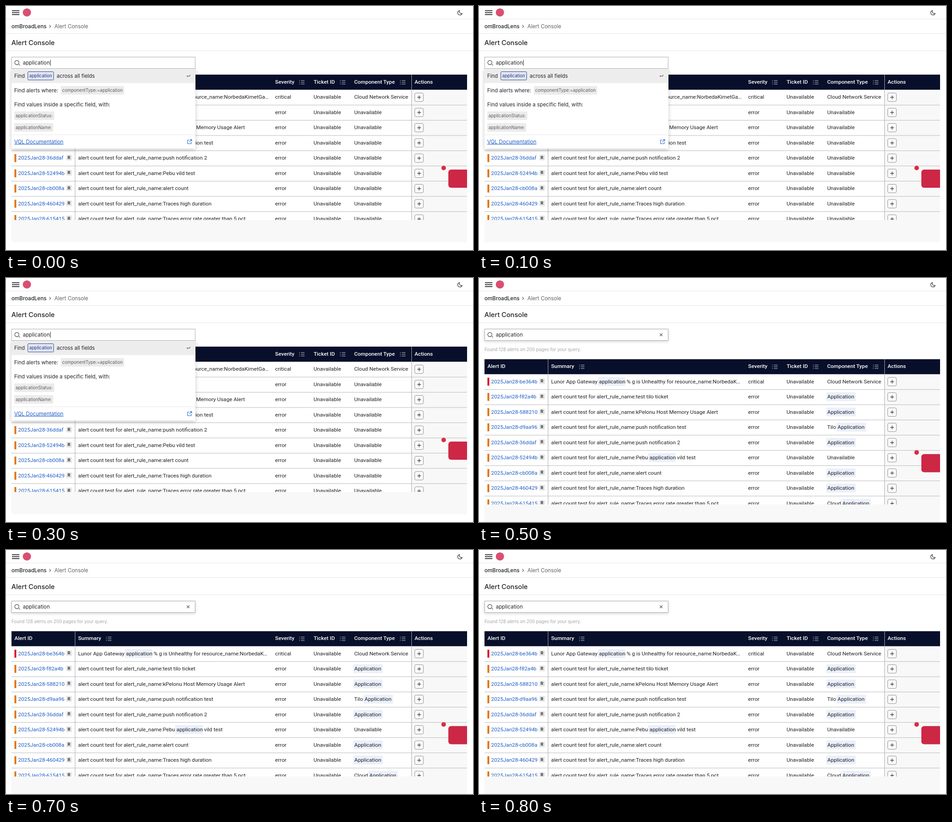
An HTML page that plays this animation: 1023x537 px, repeating every 1.15 s.

```html
<!DOCTYPE html>
<html lang="en">
<head>
<meta charset="utf-8">
<title>Alert Console</title>
<style>
  html, body { margin: 0; width: 100%; height: 100%; overflow: hidden; background: #fff; }
  svg { display: block; width: 1023px; height: 537px; }
  text { font: 11.4px Inter, sans-serif; fill: #24252b; }
  .crumb { font-size: 11.6px; }
  .title { font-size: 14.65px; }
  .medium { font-weight: 500; }
  .muted { fill: #5f6066; }
  .note { font-size: 9.7px; fill: #a5a5a8; }
  .code { font-size: 9.65px; fill: #5c5c60; }
  .picked { fill: #24377e; }
  .cell, .head, .id { font: 11.76px Roboto, sans-serif; }
  .cell { fill: #202127; }
  .head { font-weight: 500; fill: #fff; }
  .id { fill: #1f5ec4; }
  .badge { font: 700 9.4px Roboto, sans-serif; fill: #333; }
  .link { fill: #2160c9; text-decoration: underline; text-underline-offset: 2px; }
  .panel { filter: drop-shadow(0 3px 4px rgba(0, 0, 0, .22)); }
  .field { filter: drop-shadow(0 2px 3px rgba(0, 0, 0, .16)); }
</style>
</head>
<body>
<svg id="stage" viewBox="0 0 1023 537"></svg>
<script>
const LOOP = 1150, SEARCH_AT = 500;
const ROW_H = 33.5, BODY_TOP = 184.5, RESULT_SHIFT = 27.4;

const text = (x, y, value, cls) => `<text x="${x}" y="${y}" class="${cls || ''}">${value}</text>`;
const rect = (x, y, w, h, fill, extra = '') =>
  `<rect x="${x}" y="${y}" width="${w}" height="${h}" fill="${fill}" ${extra}/>`;
const line = (d, color, width = 1, extra = '') =>
  `<path d="${d}" fill="none" stroke="${color}" stroke-width="${width}" ${extra}/>`;

const prefix = 'alert count test for alert_rule_name:';
// id, rule name, component type once the search has run
const alerts = [
  ['be364b', '', 'Cloud Network Service'],
  ['f82a4b', 'test tilo ticket', 'Application'],
  ['588210', 'kPelonu Host Memory Usage Alert', 'Application'],
  ['d9aa96', 'push notification test', 'Tilo Application'],
  ['36ddaf', 'push notification 2', 'Application'],
  ['52494b', 'Pebu vild test', 'Unavailable'],
  ['cb008a', 'alert count', 'Application'],
  ['460429', 'Traces high duration', 'Application'],
  ['615415', 'Traces error rate greater than 5 pct', 'Cloud Application'],
];
const matchX = { 'Application': 763, 'Tilo Application': 785.5, 'Cloud Application': 796 };

function marked(x, y, word) {
  const width = word[0] === 'A' ? 65 : 60;
  return rect(x - 2.5, y - 13.7, width, 19.5, '#ebf0fa', 'rx="2"') + text(x, y, word, 'cell');
}

function summary(i, rule, y, found) {
  if (i === 0 && !found) return text(394.4, y, 'resource_name:NorbedaKimetGa…', 'cell');
  if (i === 0) return text(158, y, 'Lunor App Gateway', 'cell') + marked(263, y, 'application')
    + text(323.5, y, '% g is Unhealthy for resource_name:NorbedaK…', 'cell');
  if (i === 5 && found) return text(158, y, prefix + 'Pebu', 'cell')
    + marked(373.5, y, 'application') + text(433.7, y, 'vild test', 'cell');
  return text(158, y, prefix + rule, 'cell');
}

function component(i, type, y, found) {
  if (!found && i > 0) return text(762.7, y, 'Unavailable', 'cell');
  if (!matchX[type]) return text(762.7, y, type, 'cell');
  const lead = type.replace('Application', '').trim();
  return text(762.7, y, lead, 'cell') + marked(matchX[type], y, 'Application');
}

function row([id, rule, type], i, found) {
  const top = BODY_TOP + i * ROW_H, y = top + 19.7;
  return rect(18.5, top + 7.5, 4, 17.5, i ? '#e0720f' : '#d90a20')
    + text(26.6, y, '2025Jan28-' + id, 'id')
    + rect(131.7, top + 8.5, 13, 13, '#e9e9ea', 'rx="2"') + text(135, top + 18.4, 'R', 'badge')
    + summary(i, rule, y, found)
    + text(589.6, y, i ? 'error' : 'critical', 'cell')
    + text(673.7, y, 'Unavailable', 'cell')
    + component(i, type, y, found)
    + rect(895.3, top + 7, 19, 18.6, '#fbfbfb', 'rx="3" stroke="#8e8e92"')
    + line(`M901 ${top + 16.4}h8m-4-4v8`, '#333', 1.2)
    + line(`M12 ${top + ROW_H}H1010`, '#b9b9bb');
}

const listIcon = x =>
  line(`M${x + 4} 164.2h8m-8 3.8h8m-8 3.8h8M${x} 164.2h1.8m-1.8 3.8h1.8m-1.8 3.8h1.8`, '#c9cbd6', 1);

function table(found) {
  const heads = [[18.5, 'Alert ID'], [158, 'Summary', 219], [589.6, 'Severity', 642],
    [673.9, 'Ticket ID', 731.5], [762.7, 'Component Type', 863], [895, 'Actions']];
  return `<g transform="translate(0 ${found ? RESULT_SHIFT : 0})">`
    + rect(12, 151, 998, 368.7, '#f8f8f8')
    + `<g clip-path="url(#view)">`
    + rect(12, 184, 876.5, 287, '#fff')
    + alerts.map((a, i) => row(a, i, found)).join('')
    + rect(12, 151, 998, 33.3, '#080f2a')
    + line('M151.3 151V471M888.5 151V471', '#a9aab0')
    + heads.map(([x, label, icon]) => text(x, 170.5, label, 'head') + (icon ? listIcon(icon) : '')).join('')
    + rect(969, 360, 50, 40, '#cd2746', 'rx="6"')
    + `<circle cx="958.7" cy="356.5" r="5" fill="#dc2c40"/></g></g>`;
}

const chip = (x, y, w, label) =>
  rect(x, y, w, 19, '#ececed', 'rx="2"') + text(x + 3, y + 12.8, label, 'code');

const searchBox = () => rect(12.3, 112.4, 402, 25.2, '#fff', 'stroke="#aaaaac"')
  + line('M28.2 128.2l2.5 2.6M28.4 124.5a4.6 4.6 0 1 1-9.2 0a4.6 4.6 0 1 1 9.2 0', '#45464b', 1.1)
  + text(37, 129, 'application');

const typing = () => table(false)
  + `<g class="panel">${rect(12, 137, 403, 177, '#fff')}</g>`
  + searchBox()
  + line('M97.4 118.5v13', '#222')
  + rect(12, 138, 403, 31.5, '#ededed')
  + text(18, 157.8, 'Find')
  + rect(47.8, 144.5, 56.5, 18.3, '#e1e6f3', 'rx="2" stroke="#33458a"')
  + text(51, 157.2, 'application', 'code picked')
  + text(111, 157.8, 'across all fields')
  + line('M403 151v3.4h-6.6m2-2l-2 2l2 2', '#55565a')
  + text(18, 189.8, 'Find alerts where:') + chip(120, 176, 139, 'componentType:=application')
  + text(18, 220.9, 'Find values inside a specific field, with:')
  + chip(18, 232, 88, 'applicationStatus:') + chip(18, 257.8, 85.5, 'applicationName:')
  + line('M12 283.5H415', '#e6e6e7')
  + text(18, 302.7, 'VQL Documentation', 'link')
  + line('M401.5 295h-3.7v8h8v-3.8M403 294h3.8v3.8M406.6 294.2l-5 5', '#2160c9', 1.1);

const results = () => table(true)
  + `<g class="field">${searchBox()}</g>`
  + line('M396.2 122.2l5.6 5.6m0-5.6l-5.6 5.6', '#45464b', 1.1)
  + text(12, 161, 'Found 128 alerts on 200 pages for your query.', 'note');

const chrome = () => line('M13 10.4h16.4m-16.4 4.2h16.4m-16.4 4.2h16.4', '#222328', 1.7)
  + '<circle cx="45.8" cy="14.2" r="9" fill="#d94f70"/>'
  + line('M993.6 10a4.9 4.9 0 1 0 5.6 6a4.3 4.3 0 0 1-5.6-6z', '#2b2c31', 1.2, 'stroke-linejoin="round"')
  + line('M0 28.5H1023M0 60.5H1023M0 98.5H1023', '#e6e6e8')
  + text(12, 49, 'omBroadLens', 'crumb medium')
  + line('M95 42l2.8 2.9l-2.8 2.9', '#55565a', 1.1)
  + text(106, 49, 'Alert Console', 'crumb muted')
  + text(11.8, 86, 'Alert Console', 'title medium');

const stage = document.getElementById('stage');
stage.innerHTML = `<clipPath id="view">${rect(12, 151, 998, 320, '#000')}</clipPath>`
  + chrome() + `<g id="typing">${typing()}</g><g id="results">${results()}</g>`;

// Hard cut between the open suggestions and the filtered table.
function cut(id, before, after) {
  document.getElementById(id).animate([
    { visibility: before, easing: 'step-end' },
    { visibility: after, offset: SEARCH_AT / LOOP, easing: 'step-end' },
    { visibility: after },
  ], { duration: LOOP, iterations: Infinity });
}
cut('typing', 'visible', 'hidden');
cut('results', 'hidden', 'visible');
</script>
</body>
</html>
```
